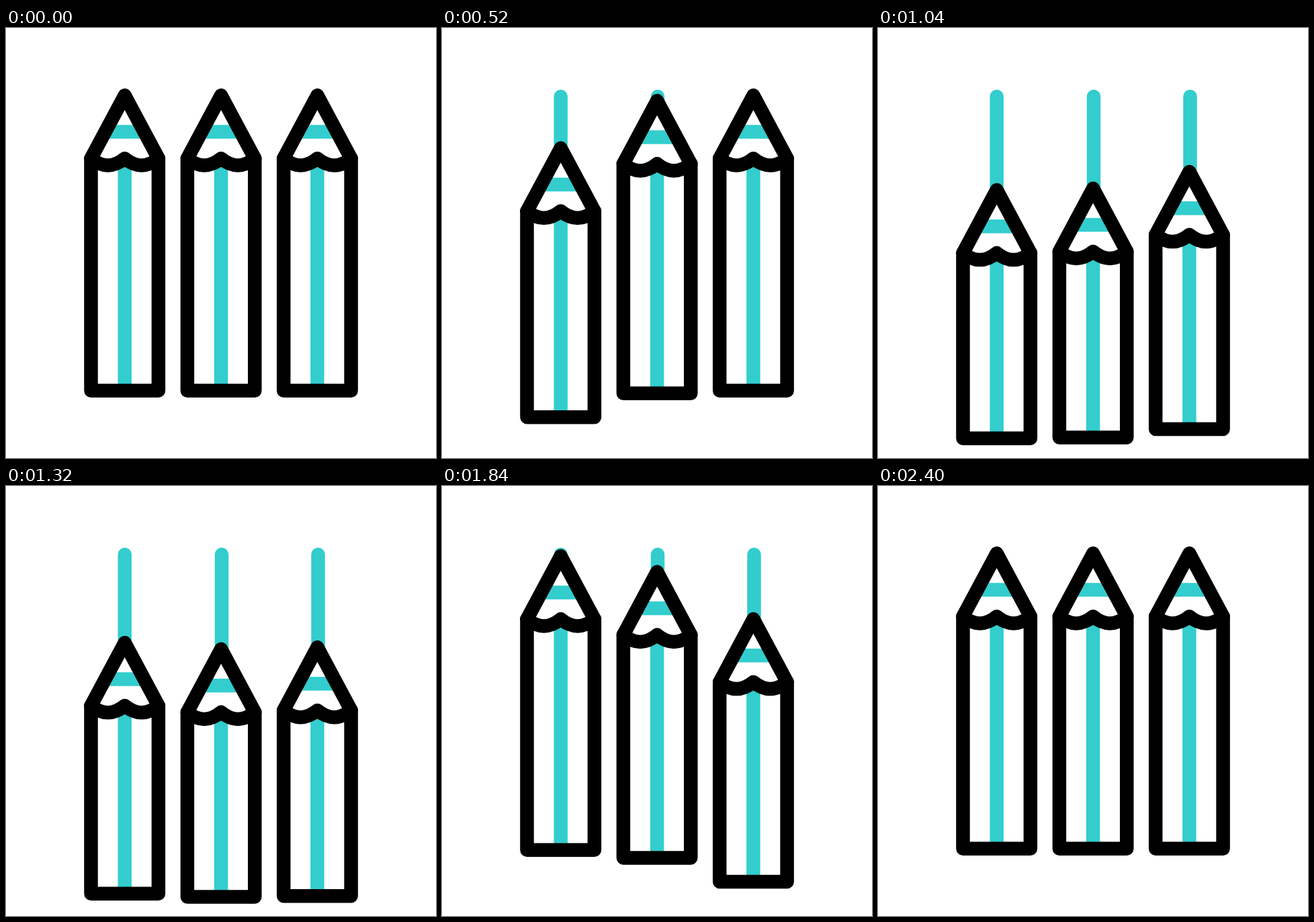
Write an HTML page that moves like this. It is 640 by 640 pixels and loops after 3 s.

```html
<!DOCTYPE html>
<html lang="en">
<head>
<meta charset="utf-8">
<title>Pencils</title>
<style>
  html, body { margin: 0; width: 100%; height: 100%; overflow: hidden; background: #fff; }
  svg { display: block; width: 100%; height: 100%; }
  .trail, .stripe, .band { stroke: #33cdcd; stroke-width: 20.5; fill: none; }
  .trail { stroke-linecap: round; }
  .body { fill: #fff; }
  .outline, .wave { fill: none; stroke: #000; stroke-width: 20.5; stroke-linejoin: round; stroke-linecap: round; }
</style>
</head>
<body>
<svg viewBox="0 0 640 640"></svg>
<script>
const LOOP = 3000, STEP = 40, MOVE = 800, STAGGER = 200, DOWN = 200, UP = 1200;
const TIP = 100.4, SHOULDER = 194.2, BASE = 539.7, HALF = 50.2;
const BASE_RATIO = 0.505;

const svg = document.querySelector('svg');

function add(parent, tag, className) {
  const node = document.createElementNS('http://www.w3.org/2000/svg', tag);
  if (className) node.setAttribute('class', className);
  return parent.appendChild(node);
}

// x: centre, trailX: centre of the drawn line, drop: how far the tip sinks
const pencils = [
  { x: 176.7, trailX: 176.7, drop: 140.6 },
  { x: 320.1, trailX: 321, drop: 142.4 },
  { x: 463.4, trailX: 464.5, drop: 140.6 },
].map(pencil => {
  const group = add(svg, 'g');
  const parts = {};
  for (const name of ['trail', 'body', 'stripe', 'band', 'wave', 'outline'])
    parts[name] = add(group, 'path', name);
  return { ...pencil, parts };
});

// Cubic Bezier timing curve (0.427, 0, 0.242, 1)
function ease(p) {
  if (p <= 0) return 0;
  if (p >= 1) return 1;
  let low = 0, high = 1;
  for (let i = 0; i < 24; i++) {
    const u = (low + high) / 2, v = 1 - u;
    const x = 3 * 0.427 * u * v * v + 3 * 0.242 * u * u * v + u * u * u;
    if (x < p) low = u; else high = u;
  }
  return low * low * (3 - 2 * low);
}

function drawPencil({ x, trailX, drop, parts }, index, time) {
  const local = time - index * STAGGER;
  const sink = drop * (ease((local - DOWN) / MOVE) - ease((local - UP) / MOVE));
  const tip = TIP + sink, shoulder = SHOULDER + sink, base = BASE + sink * BASE_RATIO;
  const left = x - HALF, right = x + HALF;
  const set = (name, d) => parts[name].setAttribute('d', d);
  const shape = `M${left} ${shoulder}L${x} ${tip}L${right} ${shoulder}V${base}H${left}Z`;

  set('trail', sink > 0.4 ? `M${trailX} 101.9V${tip + 8}` : '');
  set('body', shape);
  set('outline', shape);
  set('stripe', `M${x} ${shoulder}V${base}`);
  set('band', `M${x - 25} ${tip + 54.2}H${x + 25}`);
  set('wave', `M${left} ${shoulder}Q${x - HALF / 2} ${shoulder + 20.6} ${x} ${shoulder}` +
    `Q${x + HALF / 2} ${shoulder + 20.6} ${right} ${shoulder}`);
}

function render(elapsed) {
  const time = Math.floor((elapsed % LOOP) / STEP) * STEP;
  pencils.forEach((pencil, index) => drawPencil(pencil, index, time));
}

const start = performance.now();
function tick() {
  render(performance.now() - start);
  requestAnimationFrame(tick);
}
tick();
</script>
</body>
</html>
```
